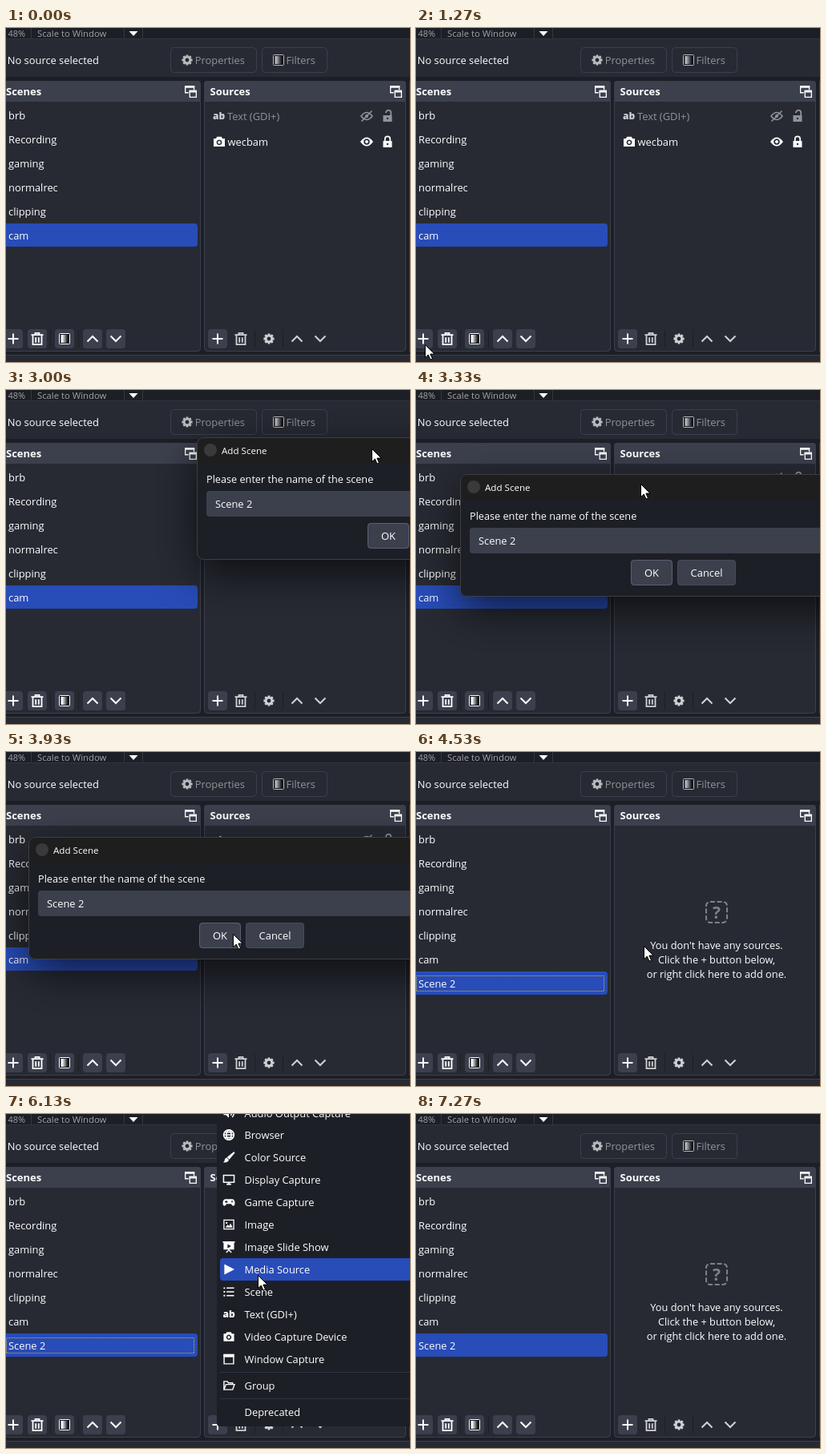
Recreate the animation shown at these times as an HTML page with a canvas. Size 504 by 417 pixels, loop 8 s.

```html
<!DOCTYPE html>
<html lang="en">
<head>
<meta charset="utf-8">
<title>Scenes and sources</title>
<style>
html, body { margin: 0; width: 100%; height: 100%; overflow: hidden; background: #1d1f26; }
canvas { display: block; width: 504px; height: 417px; }
</style>
</head>
<body>
<canvas id="stage" width="504" height="417"></canvas>
<script>
const ctx = document.getElementById('stage').getContext('2d');
const LOOP = 8000, STEP = 1000 / 15;
const DARK = '#1d1f26', PANEL = '#272a33', RAISED = '#3c404d', PRESSED = '#13141a';
const BLUE = '#284cb8', WHITE = '#fefefe', SOFT = '#d0d1d4', DIM = '#929398';

// Icons on a 16 x 16 grid: [fill, stroke, stroke width]
const icons = {
  plus: ['', 'M8 1.5V14.5M1.5 8H14.5', 2],
  trash: ['', 'M.5 3.2H15.5M5.5 3V.8H10.5V3M2.5 4V15.2H13.5V4M6.2 6.3V12.8M9.8 6.3V12.8', 1.8],
  up: ['', 'M1.5 11.5L8 5L14.5 11.5', 2],
  down: ['', 'M1.5 4.5L8 11L14.5 4.5', 2],
  dock: ['M0 0H13V3H0ZM6 6H16V9H6Z', 'M5 9.3H.7V.7H12.3V5.5M6.7 6.7H15.3V15.3H6.7Z', 1.4],
  eye: ['M0 8Q8 -3 16 8Q8 19 0 8ZM8 4.2a3.8 3.8 0 1 0 .01 0ZM8 6a2 2 0 1 0 .01 0Z', '', 0],
  hidden: ['M8 6a2 2 0 1 0 .01 0Z', 'M1 8Q8 -1 15 8Q8 17 1 8ZM1.5 14.5L14.5 1.5', 1.6],
  lock: ['M2.5 7H13.5V15H2.5ZM8 9.7a1.2 1.2 0 1 0 .01 0Z', 'M4.8 7V4.5A3.2 3.2 0 0 1 11.2 4.5V7', 1.8],
  open: ['M2.5 7H13.5V15H2.5ZM8 9.7a1.2 1.2 0 1 0 .01 0Z', 'M6 4V3.8A3 3 0 0 1 12.2 3.8V7', 1.8],
  camera: ['M1 4H4L5.2 1.8H10.8L12 4H15V14H1ZM8 5.4a3.4 3.4 0 1 0 .01 0ZM8 7a1.8 1.8 0 1 0 .01 0Z', '', 0],
  sound: ['M1 5.5H4L8 2V14L4 10.5H1Z', 'M10.5 5Q13 8 10.5 11M12.5 2.5Q17 8 12.5 13.5', 1.5],
  globe: ['', 'M8 1.2a6.8 6.8 0 1 0 .01 0ZM1.5 8H14.5M8 1.2C3.5 5 3.5 11 8 14.8C12.5 11 12.5 5 8 1.2M2.5 4.6H13.5M2.5 11.4H13.5', 1.6],
  brush: ['M14.8 .5L16 2.2L8.7 11L5.5 8ZM5.2 8.6L8 11.4Q6.5 15.7 .5 14.7Q2.5 13.5 2.4 11.6Q3 8.8 5.2 8.6Z', '', 0],
  monitor: ['M5 13H11V15H5Z', 'M1 2H15V11.5H1ZM8 11.5V14', 1.6],
  pad: ['M4 4H12Q16 4 16 9Q16 13 13.6 13Q12 12.5 11 10.5H5Q4 12.5 2.4 13Q0 13 0 9Q0 4 4 4ZM4 5.8V7H2.8V8.2H4V9.4H5.2V8.2H6.4V7H5.2V5.8ZM11.5 6V8.4H13V6Z', '', 0],
  image: ['M3.5 12L6.4 8L8.2 10L10.3 6.5L13 12ZM5 4.6a1.2 1.2 0 1 0 .01 0Z', 'M1.5 2H14.5V14H1.5Z', 1.4],
  slides: ['M0 .5H16V2.5H15V11.5H1V2.5H0ZM6.3 4.2V9.8L11 7Z', 'M8 11V13M4.5 15.5L8 12L11.5 15.5', 1.5],
  play: ['M2 1L15.5 8L2 15Z', '', 0],
  list: ['M1 2H3V4H1ZM1 7H3V9H1ZM1 12H3V14H1Z', 'M5 3H15M5 8H15M5 13H15', 1.5],
  window: ['M1 1.5H15V5.5H1Z', 'M1.7 2H14.3V14.3H1.7Z', 1.5],
  folder: ['', 'M1.5 13.5V2.5H6L7.5 4.5H13V6.5M1.5 13.5L4.2 6.5H15.5L13 13.5Z', 1.5]
};

const menuItems = [
  ['Audio Output Capture', 'sound', -1], ['Browser', 'globe', 26], ['Color Source', 'brush', 54],
  ['Display Capture', 'monitor', 82], ['Game Capture', 'pad', 110], ['Image', 'image', 138],
  ['Image Slide Show', 'slides', 166], ['Media Source', 'play', 194], ['Scene', 'list', 222],
  ['Text (GDI+)', 'ab', 250], ['Video Capture Device', 'camera', 278],
  ['Window Capture', 'window', 306], ['Group', 'folder', 339], ['Deprecated', '', 372]
];

// Tracks: [time, x, y]
const dialogTrack = [[2800, 430, 18], [3000, 239, 60], [3130, 146, 83], [3333, 56, 106], [3600, 29, 107]];
const cursorTracks = [
  [[40, 512, 326], [330, 335, 343], [600, 125, 378], [870, 19, 396], [1000, 12, 396],
   [1550, 12, 396], [1750, 90, 340], [1950, 330, 200], [2133, 505, 115]],
  [[2800, 650, 32], [3000, 457, 74], [3130, 369, 97], [3333, 281, 118], [3600, 254, 120],
   [3630, 254, 120], [3800, 270, 185], [3950, 286, 233], [4480, 286, 233], [4533, 285, 243],
   [4750, 272, 330], [4950, 265, 380], [5130, 264, 389], [5690, 264, 389], [5900, 278, 330],
   [6200, 325, 165], [6467, 352, 85], [6533, 350, 83], [6740, 350, 83], [6800, 349, 83],
   [7040, 349, 83], [7260, 506, 40]]
];

const clamp = v => Math.max(0, Math.min(1, v));

function along(keys, t) {
  if (t <= keys[0][0]) return keys[0].slice(1);
  for (let i = 1; i < keys.length; i++) {
    const [a, ax, ay] = keys[i - 1], [b, bx, by] = keys[i];
    if (t <= b) {
      const k = (t - a) / (b - a);
      return [ax + (bx - ax) * k, ay + (by - ay) * k];
    }
  }
  return keys[keys.length - 1].slice(1);
}

function rect(x, y, w, h, color) {
  ctx.fillStyle = color;
  ctx.fillRect(x, y, w, h);
}

function box(x, y, w, h, r, fill, line) {
  ctx.beginPath();
  ctx.roundRect(x, y, w, h, r);
  if (fill) { ctx.fillStyle = fill; ctx.fill(); }
  if (!line) return;
  ctx.beginPath();
  ctx.roundRect(x + .5, y + .5, w - 1, h - 1, r);
  ctx.strokeStyle = line;
  ctx.lineWidth = 1;
  ctx.stroke();
}

function text(str, x, mid, color = WHITE, size = 12.9, weight = 400, align = 'left') {
  ctx.font = `${weight} ${size}px "Open Sans", "Noto Sans", sans-serif`;
  ctx.textAlign = align;
  ctx.fillStyle = color;
  ctx.fillText(str, x, Math.round(mid + size * .36));
}

function icon(name, cx, cy, color = WHITE, size = 16) {
  if (name === 'ab') return text('ab', cx, cy, color, 12, 800, 'center');
  const [fill, stroke, width] = icons[name];
  ctx.save();
  ctx.translate(cx - size / 2, cy - size / 2);
  ctx.scale(size / 16, size / 16);
  ctx.fillStyle = ctx.strokeStyle = color;
  if (fill) ctx.fill(new Path2D(fill), 'evenodd');
  ctx.lineWidth = width;
  if (stroke) ctx.stroke(new Path2D(stroke));
  ctx.restore();
}

function gear(cx, cy, color) {
  ctx.strokeStyle = color;
  ctx.lineWidth = 2.8;
  ctx.beginPath();
  ctx.arc(cx, cy, 3.8, 0, 7);
  ctx.stroke();
  ctx.beginPath();
  for (let i = 0; i < 8; i++) {
    const c = Math.cos(i * Math.PI / 4), s = Math.sin(i * Math.PI / 4);
    ctx.moveTo(cx + c * 4.2, cy + s * 4.2);
    ctx.lineTo(cx + c * 6.6, cy + s * 6.6);
  }
  ctx.stroke();
}

function filterIcon(cx, cy, color) {
  const g = ctx.createLinearGradient(cx - 5, 0, cx + 5, 0);
  g.addColorStop(.2, color);
  g.addColorStop(.9, PRESSED);
  rect(cx - 6, cy - 6, 12, 12, PRESSED);
  rect(cx - 4.5, cy - 5, 9, 10, g);
  box(cx - 7, cy - 7, 14, 14, 1, null, color);
}

const tool = (cx, pressed) => box(cx - 12, 376, 24, 24, 4, pressed ? PRESSED : RAISED);
const divider = x => rect(x, 377, 1, 22, DARK);

function dock(x, w, title, titleX) {
  box(x, 66, w, 338, 4, PANEL, RAISED);
  box(x, 66, w, 26, [4, 4, 0, 0], RAISED);
  text(title, titleX, 79, WHITE, 13, 700);
  icon('dock', x + w - 12.5, 79.5, WHITE, 15);
}

function topBars() {
  rect(0, 0, 504, 417, DARK);
  text('48%', 2.5, 6.6, '#a2a3a8', 11);
  text('Scale to Window', 39, 6.6, '#a2a3a8', 11.3);
  for (const x of [31, 147, 170]) rect(x, 0, 1, 13, '#343741');
  ctx.fillStyle = WHITE;
  ctx.fill(new Path2D('M153.5 4H164.5L159 10Z'));
  rect(0, 13, 504, 1, '#31343f');
  rect(0, 14, 504, 47, PANEL);
  text('No source selected', 1.7, 40);
  box(205, 24, 108, 32, 4, null, RAISED);
  gear(226, 40, '#b9babd');
  text('Properties', 235.7, 40, DIM);
  box(319, 24, 82, 32, 4, null, RAISED);
  filterIcon(340, 40, '#b9babd');
  text('Filters', 349.5, 40, DIM);
}

function scenes(t, added, focused) {
  dock(-8, 251, 'Scenes', 0);
  const names = ['brb', 'Recording', 'gaming', 'normalrec', 'clipping', 'cam'];
  if (added) names.push('Scene 2');
  const top = 94 + (names.length - 1) * 30;
  box(-8, top, 247, 29, 4, BLUE);
  names.forEach((n, i) => text(n, 3, 109 + i * 30));
  if (focused) {
    ctx.setLineDash([1, 1]);
    ctx.lineDashOffset = .5;
    ctx.strokeStyle = '#d7b347';
    ctx.lineWidth = 1;
    ctx.strokeRect(.5, top + 5.5, 234, 19);
    ctx.setLineDash([]);
    ctx.lineDashOffset = 0;
  }
  for (const x of [9, 39, 73, 108, 137]) tool(x, x === 9 && t >= 1199 && t < 1260);
  divider(55);
  divider(90);
  icon('plus', 9, 388);
  icon('trash', 39, 388);
  filterIcon(73, 388, WHITE);
  icon('up', 108, 388);
  icon('down', 137, 388);
}

function sources(t, empty) {
  dock(247, 252, 'Sources', 254.5);
  if (empty) {
    ctx.strokeStyle = '#7f8186';
    ctx.lineWidth = 2;
    ctx.setLineDash([6, 2.6]);
    ctx.beginPath();
    ctx.roundRect(362, 187, 26, 26, 5);
    ctx.stroke();
    ctx.setLineDash([]);
    text('?', 375, 200, '#7f8186', 21, 700, 'center');
    ["You don't have any sources.", 'Click the + button below,', 'or right click here to add one.']
      .forEach((s, i) => text(s, 375, 241 + i * 18, WHITE, 12.8, 400, 'center'));
  } else {
    icon('ab', 265.5, 110, SOFT);
    text('Text (GDI+)', 276, 110, DIM);
    icon('hidden', 450, 110, DIM);
    icon('open', 476, 110, DIM);
    icon('camera', 266, 142);
    text('wecbam', 276.5, 142);
    icon('eye', 450, 142);
    icon('lock', 476, 142);
  }
  tool(264, t >= 5530 && t < 5660);
  divider(310);
  divider(345);
  icon('plus', 264, 388);
  icon('trash', 293, 388, SOFT);
  gear(328, 388, SOFT);
  icon('up', 363, 388, SOFT);
  icon('down', 392, 388, SOFT);
}

function dialog(t) {
  const fade = clamp((4200 - t) / 200);
  if (t < 2795 || !fade) return;
  const [x, y] = along(dialogTrack, t);
  const zoom = .94 + .06 * fade;
  ctx.save();
  ctx.globalAlpha = fade;
  ctx.translate(Math.round(x) + 277, Math.round(y) + 75);
  ctx.scale(zoom, zoom);
  ctx.translate(-277, -75);
  ctx.save();
  ctx.shadowColor = 'rgba(0,0,0,.65)';
  ctx.shadowBlur = 54;
  ctx.shadowOffsetY = 18;
  box(-1, -1, 557, 153, 8, DARK);
  ctx.restore();
  box(-1, -1, 557, 32, [8, 8, 0, 0], '#1e1e1f');
  box(-1, -1, 557, 153, 8, null, '#3d3e43');
  ctx.fillStyle = '#3a393c';
  ctx.beginPath();
  ctx.arc(16, 15, 8, 0, 7);
  ctx.fill();
  text('Add Scene', 30, 15.5, WHITE, 11.6);
  text('Please enter the name of the scene', 11, 51, WHITE, 12.7);
  box(11, 66, 533, 32, 4, RAISED);
  text('Scene 2', 22, 82);
  box(212, 106, 52, 32, 4, t > 3960 && t < 4030 ? PRESSED : RAISED, '#596074');
  text('OK', 238, 122, WHITE, 12.9, 400, 'center');
  box(270, 106, 73, 32, 4, RAISED, '#464b59');
  text('Cancel', 306.5, 122, WHITE, 12.9, 400, 'center');
  ctx.restore();
}

function menu(t, [mx, my]) {
  const alpha = Math.min(clamp((t - 5605) / 140), clamp((7066 - t) / 133));
  if (!alpha) return;
  ctx.save();
  ctx.globalAlpha = alpha;
  box(263, -80, 280, 470, 4, DARK);
  for (const y of [322, 355]) rect(267, y, 237, 1, '#31343f');
  for (const [label, glyph, y] of menuItems) {
    if (mx > 266 && Math.abs(my - y) < 14) box(267, y - 14, 272, 28, 4, BLUE);
    if (glyph) icon(glyph, 278, y, WHITE, 15);
    text(label, 297.5, y);
  }
  ctx.restore();
}

function cursor([x, y]) {
  ctx.save();
  ctx.translate(Math.round(x) - .5, Math.round(y) - .5);
  const arrow = new Path2D('M0 0V16.2L3.8 12.6L6.5 18.6L9 17.5L6.4 11.6H11.6Z');
  ctx.fillStyle = '#fff';
  ctx.fill(arrow);
  ctx.strokeStyle = '#000';
  ctx.lineWidth = 1;
  ctx.stroke(arrow);
  ctx.restore();
}

function draw(t) {
  const added = t > 4060;
  const focused = (t >= 1199 && t < 1260) || (t > 4190 && t < 7130);
  const pointer = along(cursorTracks[t < 2500 ? 0 : 1], t);
  topBars();
  scenes(t, added, focused);
  sources(t, added);
  rect(503, 66, 1, 338, RAISED);
  rect(0, 408, 504, 1, RAISED);
  rect(0, 409, 504, 8, PANEL);
  dialog(t);
  menu(t, pointer);
  cursor(pointer);
}

const start = performance.now();
function tick(now) {
  const t = Math.max(0, now - start) % LOOP;
  draw(Math.floor((t + 4) / STEP) * STEP);
  requestAnimationFrame(tick);
}
requestAnimationFrame(tick);
</script>
</body>
</html>
```
